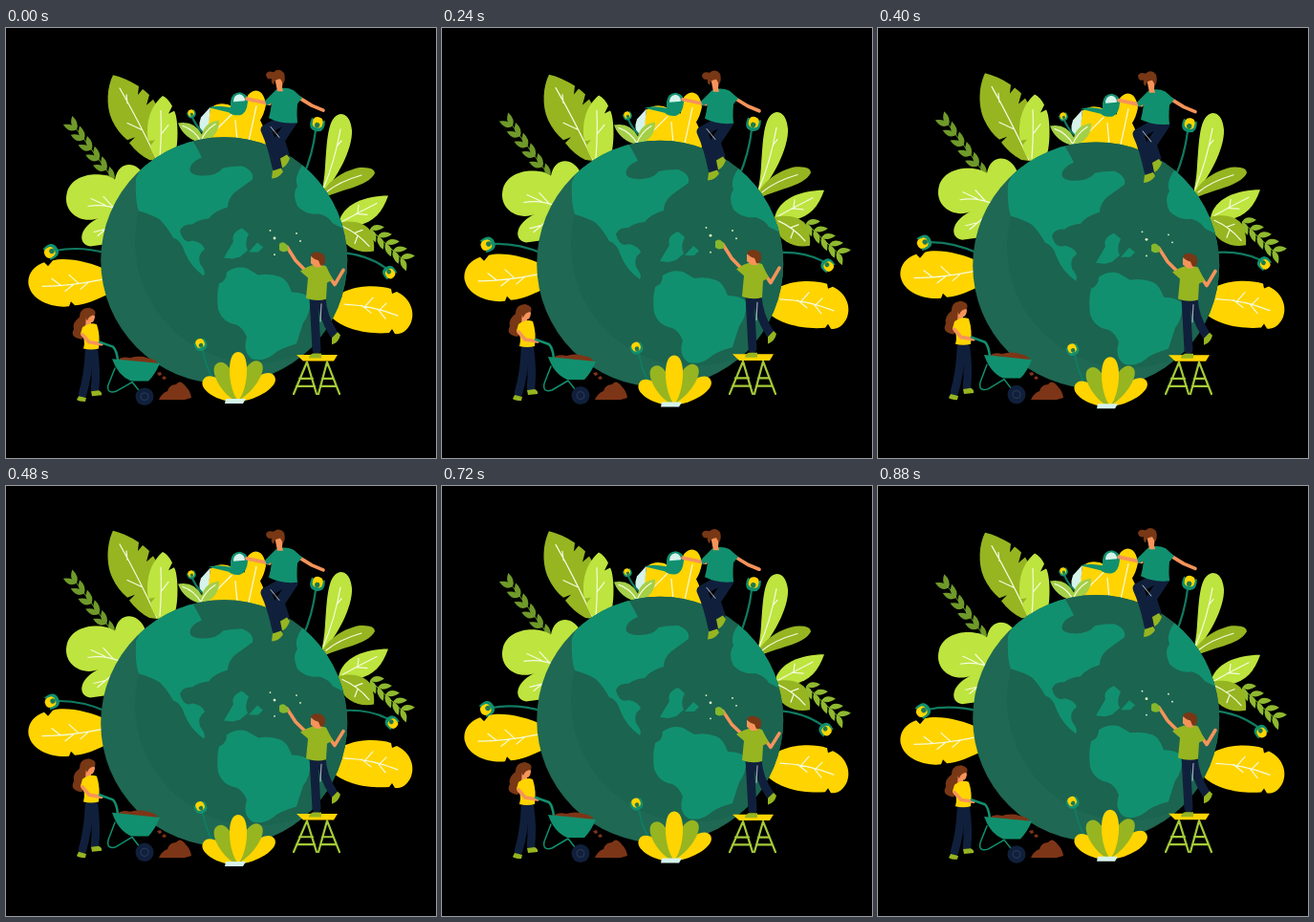
Animation, 450 px wide and 450 px high, one loop 0.96 s. Source, as an HTML page:

```html
<!DOCTYPE html>
<html lang="en">
<head>
<meta charset="utf-8">
<title>Caring for the planet</title>
<style>
  html, body { margin: 0; width: 100%; height: 100%; overflow: hidden; background: #000; }
  svg { display: block; width: 100vw; height: 100vh; }
  .lime { fill: #bee43f; }
  .olive { fill: #96b521; }
  .yellow { fill: #ffd400; }
  .teal { fill: #11906f; }
  .navy { fill: #10203c; }
  .skin { fill: #f6935a; }
  .hair { fill: #783715; }
  .pale { fill: #d5f3eb; }
  .line { fill: none; stroke-linecap: round; stroke-linejoin: round; }
  .vein { fill: none; stroke: #f4fbdc; stroke-width: 1.2; stroke-linecap: round; }
  .stem { fill: none; stroke: #117a61; stroke-width: 2.2; stroke-linecap: round; }
  .limb { stroke: #f6935a; stroke-width: 3.6; }
  .leg { stroke: #10203c; }
</style>
</head>
<body>
<svg viewBox="0 0 450 450">
  <defs>
    <clipPath id="disc"><circle cx="228.2" cy="245.7" r="129"/></clipPath>
    <path id="petal" d="M0 0C-10 -10 -14 -50 0 -50S10 -10 0 0Z"/>
    <path id="leaflet" d="M0 0Q6 -7 15 0Q6 5 0 0Z"/>
    <g id="flower">
      <path class="teal" d="M-7 -5Q-10 8 0 8Q10 8 7 -5Q4 -3 0 -3Q-4 -3 -7 -5Z"/>
      <path class="yellow" d="M-5 2Q-7 -7 0 -7Q7 -7 5 2Q3 5 0 4Q-3 5 -5 2Z"/>
      <circle cy="1.500" r="2.700" fill="#1d7a52"/>
    </g>
  </defs>

  <!-- foliage behind the globe: data-move = kind, pivot x, pivot y, amount, peak time -->
  <g data-move="stretch 150 140 .015 560">
    <path class="olive" d="M112 48C106 60 104 80 111 96Q117 109 127 117L135 114L129 120Q138 132 150 138L166 140C166 120 166 92 154 74L147 80L150 69Q147 66 143 63L138 69L139 60Q125 51 112 48Z"/>
    <path class="vein" d="M119 62Q138 95 158 138M127 78L126 69M142 106L127 99"/>
    <path class="lime" d="M164 70C150 82 146 100 149 118L156 117L151 123Q154 136 162 140Q172 140 177 132C181 120 180 92 176 86L170 89L174 81Q170 73 164 70Z"/>
    <path class="vein" d="M162 86Q163 110 161 136M163 110L170 101"/>
  </g>
  <g id="leftSprig" data-move="bob 0 0 2.5 880"></g>
  <g data-move="bob 0 0 3.5 940">
    <path class="lime" d="M145 152C138 136 118 134 114 155C100 146 70 148 64 168C58 190 80 203 98 195C78 203 73 222 88 225L110 222L145 180Z"/>
    <path class="vein" d="M122 188Q104 180 86 183M104 182L89 175M112 184L102 173M104 207L92 210M116 197L96 214"/>
  </g>
  <g data-move="sway 103 236 5.6 380">
    <path class="stem" d="M52 229Q78 226 106 236"/>
    <use href="#flower" transform="translate(47 230) rotate(-120)"/>
  </g>
  <g data-move="bob 0 0 4.5 920">
    <path class="yellow" d="M106 249C88 240 62 235 49 239L44 245L40 241C25 246 22 258 24 266C28 282 50 289 66 287L68 282L72 286C85 285 96 279 106 275Z"/>
    <path class="vein" d="M38 266Q66 266 100 259M57 265L48 258M76 263L66 254M71 264L62 271M86 262L78 269"/>
  </g>
  <g data-move="stretch 345 177 .023 240">
    <path class="lime" d="M350 90C336 92 336 120 334 145Q333 162 329 177C346 158 363 127 362 107Q360 90 350 90Z"/>
    <path class="vein" d="M350 106Q344 140 332 168M346 124L351 118"/>
    <path class="olive" d="M328 180C333 163 350 150 370 146Q386 145 386 152C378 167 350 168 328 180Z"/>
    <path class="vein" d="M335 172Q348 161 372 154"/>
  </g>
  <g id="rightSprig" data-move="bob 0 0 4.3 860"></g>
  <g data-move="bob 0 0 4 820">
    <path class="lime" d="M400 173C375 173 352 182 348 202Q356 205 368 204C385 201 394 190 400 173Z"/>
    <path class="vein" d="M352 200Q370 190 388 181M368 191L369 183M366 192L378 193"/>
    <path class="olive" d="M347 202C362 197 378 202 382 211Q386 221 385 231C370 234 354 228 347 210Z"/>
    <path class="vein" stroke-width=".8" d="M352 205Q368 212 380 226M365 212L373 209M368 215L365 223"/>
  </g>
  <g data-move="sway 352 236 6 860">
    <path class="stem" d="M350 235Q378 235 398 247"/>
    <use href="#flower" transform="translate(403 252) rotate(140) scale(.9)"/>
  </g>
  <g data-move="bob 0 0 3.8 810">
    <path class="yellow" d="M340 286C350 268 384 265 403 271L404 276L409 274C424 281 428 296 424 306C420 316 412 319 407 318L404 313L401 317C378 319 352 313 340 300Z"/>
    <path class="vein" d="M354 287Q382 288 410 299M376 289L384 280M391 293L398 286M372 288L382 296M389 292L397 302"/>
  </g>
  <g data-move="bob 0 0 1.5 620">
    <path class="stem" d="M324 108Q321 133 311 156"/>
    <use href="#flower" transform="translate(326 101) rotate(12)"/>
  </g>
  <g data-move="bob 0 0 1.6 420">
    <path class="yellow" d="M208 125L214 85Q225 77 238 84L250 89Q249 69 261 67Q270 67 272 82Q270 92 266 98Q272 108 272 126Z"/>
    <path class="vein" d="M262 83Q258 102 254 120M218 110Q230 98 236 92M242 120L240 98"/>
    <path class="pale" d="M214 84L204 95Q200 106 206 111L212 104Z"/>
    <path class="stem" stroke-width="1.5" d="M195 95Q199 104 205 110"/>
    <use href="#flower" transform="translate(194 91) rotate(-25) scale(.6)"/>
    <path fill="#a4cf48" d="M180 101Q197 98 205 113Q208 100 223 98Q224 114 206 122Q186 118 180 101Z"/>
    <path class="vein" d="M185 104Q197 108 204 120Q208 109 219 102"/>
  </g>

  <g data-move="bob 0 0 2.7 420">
    <circle cx="228.2" cy="245.7" r="129" fill="#1f6853"/>
    <g clip-path="url(#disc)">
      <circle cx="262" cy="226" r="127" fill="#1b6450"/>
      <g class="teal">
        <path d="M136 160Q135 184 139 194Q153 198 161 203Q169 211 175 222Q183 224 187 237Q193 252 207 262Q210 258 203 249Q200 239 208 234Q206 227 195 225Q186 229 182 215Q185 207 195 208Q201 203 212 202Q218 194 232 190Q232 181 240 174L258 161Q260 152 247 147Q235 147 227 149Q220 158 204 157Q190 156 193 148Q195 142 205 138Q201 130 194 118L150 130Z"/>
        <path d="M223 270Q231 267 231 258Q241 251 252 254L264 261Q277 259 287 263Q294 265 299 279Q313 279 319 286Q318 303 311 311Q307 323 304 333Q286 338 280 344Q270 352 258 349Q247 342 252 326Q248 316 241 313Q227 311 222 297Q220 283 223 270Z"/>
        <path d="M228 243L238 226Q235 217 247 212L254 218Q249 228 253 235L245 242L237 244Z"/>
        <path d="M254 237L263 227L269 232L264 237Z"/>
        <path d="M311 145Q301 158 305 168Q299 176 305 189Q315 199 328 197Q338 200 342 207L360 216V140Z"/>
      </g>
    </g>
    <path class="stem" d="M206 340Q209 356 217 371"/>
    <use href="#flower" transform="translate(203.500 333.500) rotate(-25) scale(.85)"/>
    <g transform="translate(241 392.500)">
      <use href="#petal" class="yellow" transform="rotate(-57) scale(1 .82)"/>
      <use href="#petal" class="yellow" transform="rotate(57) scale(1 .95)"/>
      <use href="#petal" class="olive" transform="rotate(-26) scale(1 .88)"/>
      <use href="#petal" class="olive" transform="rotate(31) scale(1 .95)"/>
      <use href="#petal" class="yellow" transform="translate(2 0) scale(1 1.02)"/>
      <path class="pale" d="M-11 -2H10L7 3H-12Z"/>
    </g>
  </g>

  <!-- gardener with the watering can -->
  <g data-move="bob 0 0 .9 520">
    <g data-move="bob 0 0 1.7 500">
      <path class="line leg" stroke-width="11" d="M300 99L286 120L291 135"/>
      <path class="line leg" stroke-width="11" d="M290 99L272 109Q279 124 284 148"/>
      <path class="line" stroke="#fff" stroke-width=".7" d="M277 106L286 117"/>
      <path class="olive" d="M279 152L288 149L290 153Q285 160 278 160ZM287 139L294 135L297 139Q294 147 289 149Z"/>
    </g>
    <path class="teal" d="M235 78Q236 68 245 68Q254 70 253 78Q252 90 245 92Q238 93 233 89L212 84Q220 81 235 84Z"/>
    <path class="pale" d="M238 78Q238 71 244 70Q250 71 250 77Z"/>
    <path class="line limb" d="M276 80L252 75M307 74L320 82L332 87"/>
    <path class="teal" d="M283 65Q293 62 301 66L310 74L305 80Q304 92 305 100Q289 102 275 95Q277 88 278 79L273 82L271 77Z"/>
    <path class="skin" d="M281 52L290 54L289 63L290 67H284Z"/>
    <path class="hair" d="M272 50Q273 45 280 47Q286 42 291 48Q293 55 290 59L287 54Q281 54 280 60Q277 58 278 54Q273 55 272 50Z"/>
  </g>

  <!-- painter on the step stool -->
  <g data-move="stretch 325 386 .032 180">
    <g class="line" stroke="#a5cb38" stroke-width="2.2">
      <path d="M315 350L301 383M315 350L325 383M336 350L327 383M336 350L349 383M307 367H321M304 375H323M331 367H342M329 375H345"/>
    </g>
    <path class="yellow" d="M304 342.500H347L343 349H311Z"/>
    <path class="line leg" stroke-width="9" d="M330 283Q331 303 343 321"/>
    <path class="line leg" stroke-width="9" d="M322 283L325 337"/>
    <path class="line" stroke="#fff" stroke-width=".7" d="M330 290L329 308"/>
    <path class="olive" d="M321 341H330V346H317Q317 343 321 341ZM341 325L347 319L350 322Q348 330 341 332Z"/>
    <path class="line limb" d="M315 257L303 245L294 231M337 260L344 270L353 255"/>
    <path class="olive" d="M315 252Q325 247 335 251L342 265L336 268L335 285Q325 288 314 284L316 263L308 256Z"/>
    <path fill="#86b82c" d="M286 228Q290 224 294 229L296 234Q290 238 286 234Z"/>
    <path class="skin" d="M319 241L331 240L330 252H324L319 248Z"/>
    <path class="hair" d="M319 240Q321 235 329 237Q335 239 334 246Q333 251 329 250L327 245Q322 244 319 240Z"/>
    <g fill="#e9f8c8">
      <circle cx="276.5" cy="214" r=".9"/><circle cx="281" cy="222" r="1.4"/>
      <circle cx="304" cy="217" r=".9"/><circle cx="308" cy="225" r=".9"/><circle cx="281" cy="239" r=".9"/>
    </g>
  </g>

  <!-- gardener with the wheelbarrow -->
  <path fill="#7d3517" d="M160 389Q163 382 169 380Q171 373 178 373Q182 367 188 375Q193 380 194 387L187 389ZM158 361l4 -1l1 3l-3 1ZM163 366l3 -2l2 3l-3 1Z"/>
  <g data-move="bob 0 0 1 960">
    <g data-move="stretch 100 390 .027 480">
      <path class="line leg" stroke-width="8.5" d="M92 336Q95 358 93 377"/>
      <path class="line leg" stroke-width="8.5" d="M87 336Q86 362 80 382"/>
      <path class="olive" d="M76 384L84 386L83 390Q76 390 74 388ZM89 379L97 378Q101 380 100 383L90 384Z"/>
      <path class="hair" d="M88 289Q77 289 77 299Q69 305 71 312Q66 321 79 323Q87 316 86 308L93 299Z"/>
      <path class="skin" d="M84 296Q92 291 93 299Q92 305 89 305V311H83Z"/>
      <path class="hair" d="M81 296Q82 288 90 290Q95 292 93 297Q87 297 85 303Z"/>
      <path class="yellow" d="M80 310Q88 304 95 307Q99 319 97 333Q89 335 81 333Q84 322 78 317Z"/>
      <path class="line limb" d="M80 318L87 326L100 328"/>
      <path class="line" stroke="#11906f" stroke-width="2.5" d="M98 326L112 331Q116 335 117 346"/>
      <path class="line" stroke="#11906f" stroke-width="1.5" d="M114 354L107 372Q105 382 115 379L132 369L143 383"/>
      <path fill="#7d3517" d="M117 345Q121 341 130 343Q140 340 148 343Q156 344 159 349L150 354L120 349Z"/>
      <path class="teal" d="M111 344L161 349Q156 361 149 368L131 368Q117 362 111 344Z"/>
      <circle cx="145" cy="384.5" r="9.5" class="navy"/>
      <circle cx="145" cy="384.5" r="4" fill="none" stroke="#2b3b58"/>
    </g>
  </g>
</svg>
<script>
const LOOP = 960, STEP = 80;

function sprig(id, color, [x0, y0], [x1, y1], pairs, angles) {
  let out = `<path d="M${x0} ${y0}L${x1} ${y1}" stroke="${color}" stroke-width="1"/>`;
  for (let i = 0; i <= pairs; i++) {
    const x = x0 + (x1 - x0) * i / pairs, y = y0 + (y1 - y0) * i / pairs;
    for (const a of angles)
      out += `<use href="#leaflet" fill="${color}" transform="translate(${x} ${y}) rotate(${a})"/>`;
  }
  document.getElementById(id).innerHTML = out;
}
sprig('leftSprig', '#6f9a2a', [113, 157], [74, 104], 5, [200, 252]);
sprig('rightSprig', '#8fb92f', [381, 207], [413, 237], 4, [-8, 68]);

const transforms = {
  bob: (x, y, v) => `translate(0 ${v})`,
  sway: (x, y, v) => `rotate(${v} ${x} ${y})`,
  stretch: (x, y, v) => `translate(0 ${-y * v}) scale(1 ${1 + v})`
};
const parts = [...document.querySelectorAll('[data-move]')].map(node => {
  const [kind, ...nums] = node.dataset.move.split(' ');
  return [node, transforms[kind], ...nums.map(Number)];
});

function draw(now) {
  const t = Math.floor(now / STEP) * STEP % LOOP;
  for (const [node, transform, x, y, amount, peak] of parts) {
    const v = amount * Math.cos(2 * Math.PI * (t - peak) / LOOP);
    node.setAttribute('transform', transform(x, y, v));
  }
  requestAnimationFrame(() => draw(performance.now()));
}
draw(0);
</script>
</body>
</html>
```
